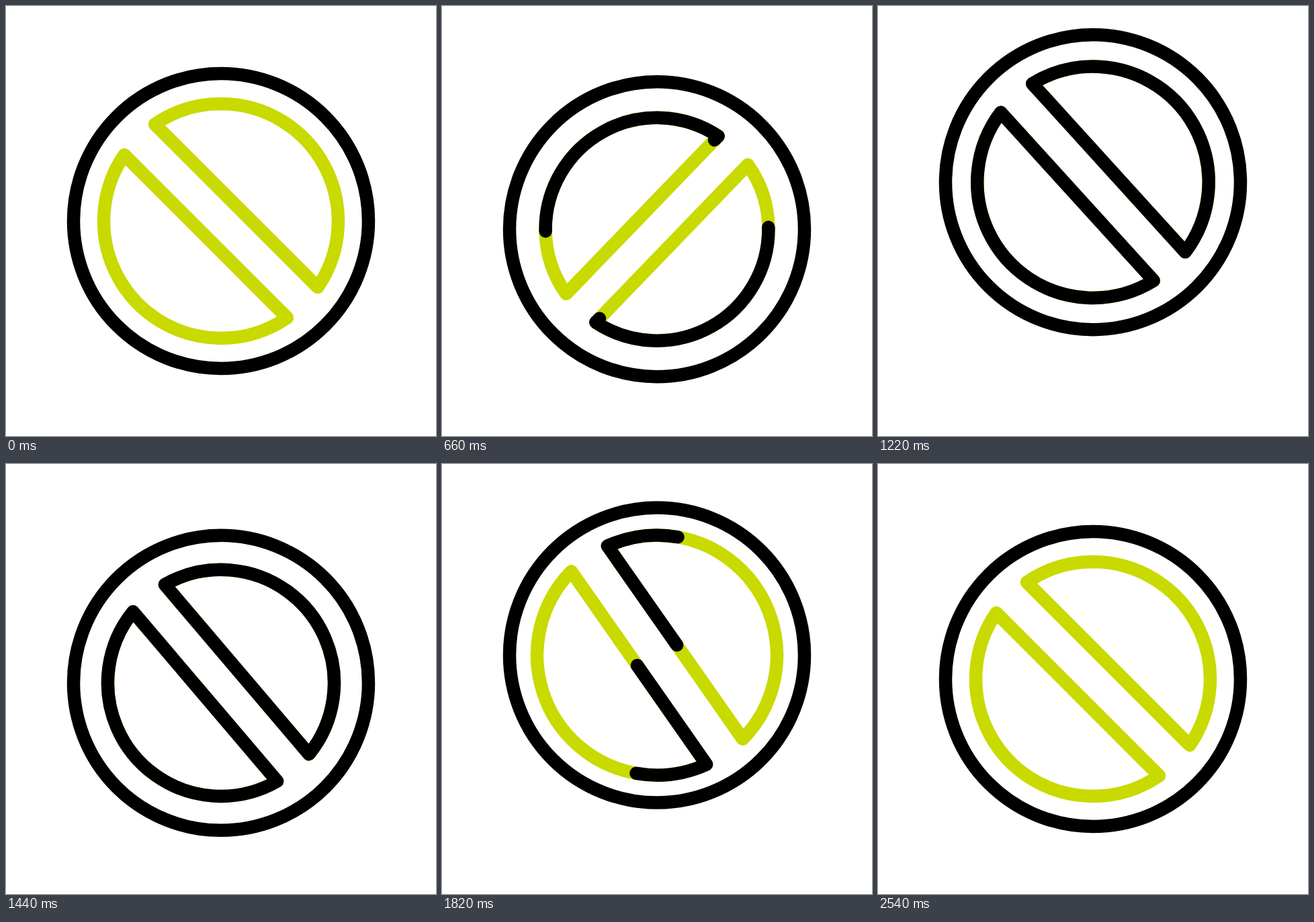
An HTML page that plays this animation: 640x640 px, repeating every 2.84 s.

```html
<!DOCTYPE html>
<html lang="en">
<head>
<meta charset="utf-8">
<title>Spinning badge</title>
<style>
  html, body { margin: 0; width: 100%; height: 100%; overflow: hidden; background: #fff; }
  svg { display: block; width: 100%; height: 100%; }
  path, circle { fill: none; stroke-linecap: round; stroke-linejoin: round; }
  .ring { stroke: #000; stroke-width: 19.5; }
  .base { stroke: #c8da00; }
  .ink { stroke: #000; }
</style>
</head>
<body>
<svg viewBox="0 0 640 640">
  <defs>
    <path id="half" pathLength="100"
      d="M0-174.5A174.5 174.5 0 0 1 144 98.5L-98.5-144A174.5 174.5 0 0 1 0-174.5"/>
  </defs>
  <g id="badge">
    <circle class="ring" r="219.5"/>
    <g id="halves">
      <use class="base" href="#half"/>
      <use class="base" href="#half" transform="rotate(180)"/>
      <g id="ink" class="ink">
        <use href="#half"/>
        <use href="#half" transform="rotate(180)"/>
      </g>
    </g>
  </g>
</svg>
<script>
const STEP = 20, LAST = 127, LOOP = 2840;

// Turning points: [step, value, softness of the move that follows (default 1)]
const bounce = [[0, 0], [13.6, 56, 0.2], [68, -72], [74.75, 49], [93, -38], [108, 18], [LAST, 0]];
const pulse = [[0, 1], [13, 0.924], [58, 0.989], [74, 0.965], [91, 1.023], [LAST, 1]];

// Moves from one turning point to the next, blending linear with sine easing
function swing(keys, x) {
  const i = keys.findIndex(key => key[0] > x);
  if (i < 0) return keys[keys.length - 1][1];
  if (i === 0) return keys[0][1];
  const [x0, v0, soft = 1] = keys[i - 1], [x1, v1] = keys[i];
  const u = (x - x0) / (x1 - x0);
  const eased = (1 - Math.cos(Math.PI * u)) / 2;
  return v0 + (v1 - v0) * (u + (eased - u) * soft);
}

// One whirl around, then a small sway past the end and back
const whirl = x => 367 / (1 + Math.exp(-0.1745 * (x - 26.95)));
const END = whirl(LAST) - whirl(0);
const sway = [[65, 0], [91, 370 - END], [LAST, 360 - END]];
const turn = x => whirl(x) - whirl(0) + swing(sway, x);

// Percent of the outline passed, slowing slightly
function sweep(x, start, length) {
  const u = Math.min(1, Math.max(0, (x - start) / length));
  return 100 * (1 - (1 - u) ** 1.15);
}

const [badge, halves, ink] = ['badge', 'halves', 'ink'].map(id => document.getElementById(id));

function draw(ms) {
  const step = Math.min(LAST, Math.floor(ms % LOOP / STEP));
  const scale = swing(pulse, step);
  const head = sweep(step, 15.45, 41.5), tail = sweep(step, 72, 31.2);
  badge.setAttribute('transform', `translate(320 ${320 + swing(bounce, step)})`);
  halves.setAttribute('transform', `rotate(${turn(step)}) scale(${scale})`);
  halves.setAttribute('stroke-width', 19.5 / scale);
  ink.setAttribute('visibility', head > tail ? 'visible' : 'hidden');
  ink.setAttribute('stroke-dasharray', `${head - tail} 200`);
  ink.setAttribute('stroke-dashoffset', -tail);
}

const start = performance.now();
function tick() {
  draw(performance.now() - start);
  requestAnimationFrame(tick);
}
tick();
</script>
</body>
</html>
```
